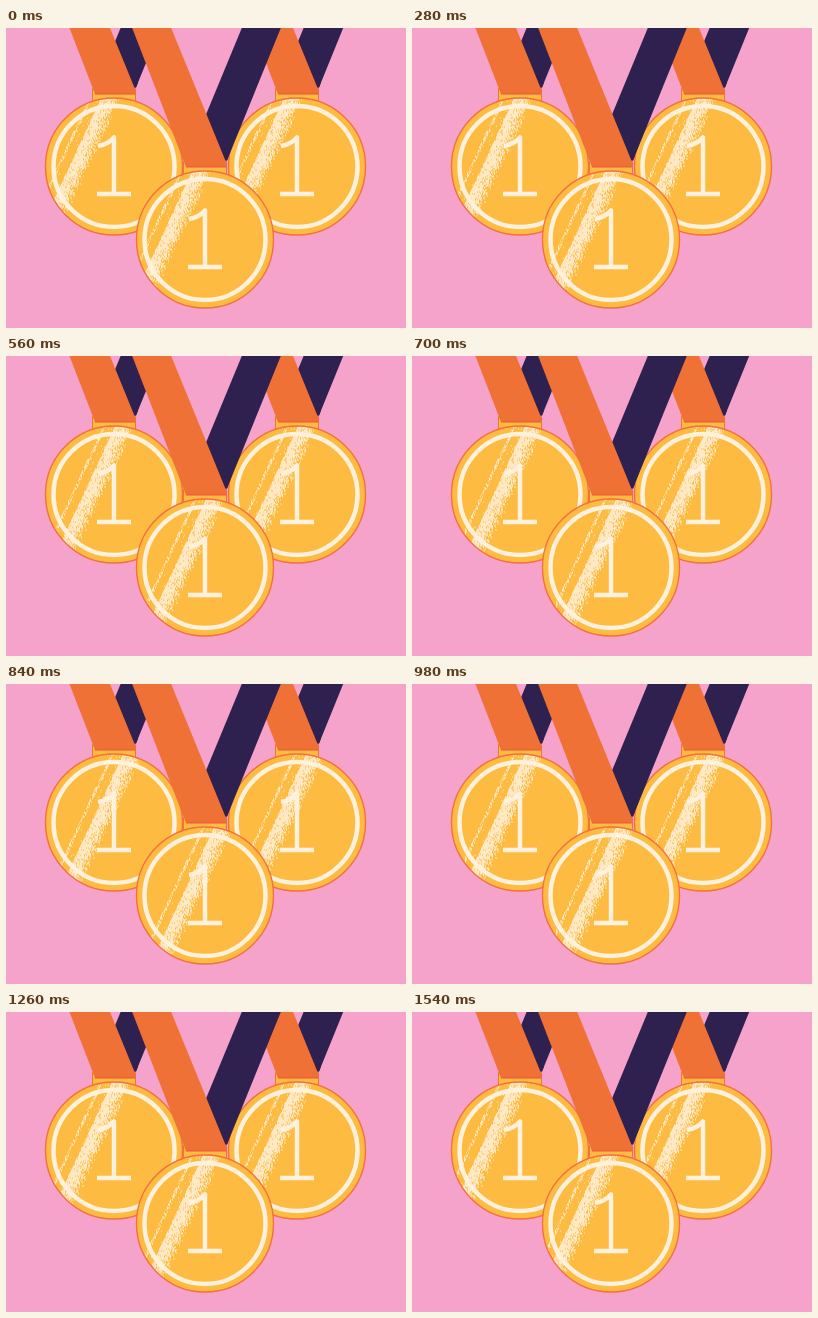
These frames come from a looping animation (400 px wide and 300 px high, 1680 ms). An HTML page with a canvas:

```html
<!DOCTYPE html>
<html lang="en">
<head>
<meta charset="utf-8">
<title>Three medals</title>
<style>
  html, body { margin: 0; width: 100%; height: 100%; overflow: hidden; background: #f5a3cb; }
  canvas { display: block; }
</style>
</head>
<body>
<canvas id="stage" width="400" height="300"></canvas>
<script>
const ctx = document.getElementById('stage').getContext('2d');
const PINK = '#f5a3cb', ORANGE = '#f07135', NAVY = '#2e2150';
const GOLD = '#fdbb42', CREAM = '#fff1dc', EDGE = '#f4713a';
const STEP = 140, STEPS = 12, SLANT = 0.465, RADIUS = 69;

// Seeded generator, so the grain is the same on every load.
let seed = 7;
function random() {
  seed = (seed * 16807) % 2147483647;
  return seed / 2147483647;
}

// How densely a column of the gloss is speckled: a thin line, a gap, then a fading band.
function density(x) {
  if (x < 3) return 0.55;
  if (x < 12) return 0.02;
  if (x < 21) return 0.88;
  return Math.max(0, 0.88 * (1 - (x - 21) / 11));
}

function makeGloss() {
  const canvas = document.createElement('canvas');
  canvas.width = 120;
  canvas.height = 2 * RADIUS;
  const g = canvas.getContext('2d');
  g.fillStyle = CREAM;
  g.globalAlpha = 0.85;
  for (let y = 0; y < canvas.height; y++) {
    const start = Math.round(SLANT * (canvas.height - y));
    for (let x = 0; x < 32; x++) {
      if (random() < density(x)) g.fillRect(start + x, y, 1, 1);
    }
  }
  return canvas;
}
const gloss = makeGloss();

function polygon(color, points) {
  ctx.beginPath();
  points.forEach(([x, y]) => ctx.lineTo(x, y));
  ctx.closePath();
  ctx.fillStyle = color;
  ctx.fill();
}

function circle(r) {
  ctx.beginPath();
  ctx.arc(0, 0, r, 0, 2 * Math.PI);
}

function stroke(color, width) {
  ctx.strokeStyle = color;
  ctx.lineWidth = width;
  ctx.stroke();
}

function drawRibbon() {
  polygon(NAVY, [[37, -212], [76, -212], [22, -79], [-18, -79]]);
  ctx.beginPath();
  ctx.rect(-21.5, -78, 43, 16);
  ctx.fillStyle = GOLD;
  ctx.fill();
  stroke(EDGE, 1);
  polygon(NAVY, [[24, -84], [22, -79], [17, -79], [15, -84]]);
  polygon(ORANGE, [[-73, -212], [-34, -212], [22, -75], [21, -72.5], [-19, -72.5]]);
  ctx.beginPath();
  ctx.moveTo(-19, -72.5);
  ctx.lineTo(21, -72.5);
  stroke('#ee543a', 1.2);
}

function drawMedal(cx, cy, shift) {
  ctx.save();
  ctx.translate(cx, cy);
  drawRibbon();

  circle(RADIUS - 0.5);
  ctx.fillStyle = GOLD;
  ctx.fill();
  ctx.save();
  ctx.clip();
  ctx.drawImage(gloss, Math.round(-57 - SLANT * RADIUS + shift), -RADIUS);
  ctx.restore();
  circle(RADIUS - 0.5);
  stroke(EDGE, 1.4);
  circle(60.5);
  stroke(CREAM, 4.5);

  // Numeral
  ctx.beginPath();
  ctx.moveTo(-16, -20.5);
  ctx.quadraticCurveTo(-6, -22, 0, -29);
  ctx.lineTo(0, 27.5);
  ctx.moveTo(-17, 27.5);
  ctx.lineTo(17, 27.5);
  ctx.lineJoin = 'round';
  stroke(CREAM, 4.5);
  ctx.restore();
}

function draw(time) {
  const step = Math.floor(time / STEP) % STEPS;
  const shift = 3.6 * Math.min(step, STEPS - step);
  ctx.fillStyle = PINK;
  ctx.fillRect(0, 0, 400, 300);
  drawMedal(108, 138.5, shift);
  drawMedal(291, 138.5, shift);
  drawMedal(199, 211.5, shift);
}

function tick() {
  draw(performance.now());
  requestAnimationFrame(tick);
}
tick();
</script>
</body>
</html>
```
